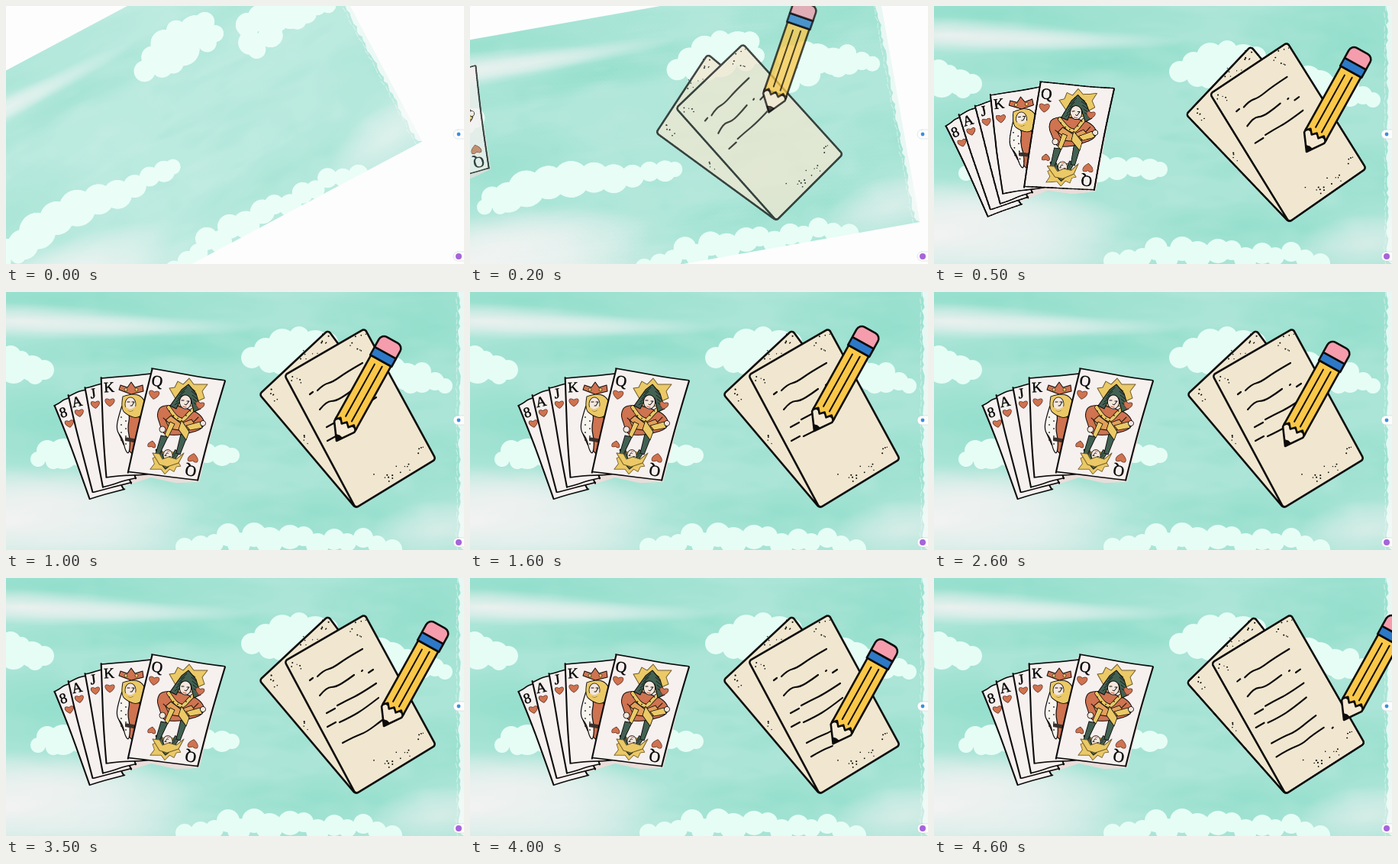
An HTML page with a canvas that plays this animation: 600x338 px, repeating every 4700 ms.

```html
<!DOCTYPE html>
<html lang="en">
<head>
<meta charset="utf-8">
<title>Cards and notes</title>
<style>
html, body { margin: 0; width: 100%; height: 100%; overflow: hidden; background: #fdfdfd; }
canvas { display: block; width: 100%; height: 100%; }
</style>
</head>
<body>
<canvas id="stage" width="600" height="338"></canvas>
<script>
const W = 600, H = 338, LOOP = 4700, STEP = 100;
const INK = '#0d0c0b', HEART = '#cf7350', GOLD = '#ebc966', GREEN = '#436152', SKIN = '#f4e7de';
const screen = document.getElementById('stage').getContext('2d');
let g = screen;

function seeded(seed) {
  return () => {
    seed = (seed * 16807) % 2147483647;
    return seed / 2147483647;
  };
}

function layer(draw) {
  const c = document.createElement('canvas');
  c.width = W * 2;
  c.height = H * 2;
  g = c.getContext('2d');
  g.scale(2, 2);
  g.lineJoin = g.lineCap = 'round';
  draw();
  g = screen;
  return c;
}

function paint(fill, stroke, width) {
  if (fill) { g.fillStyle = fill; g.fill(); }
  if (stroke) { g.strokeStyle = stroke; g.lineWidth = width; g.stroke(); }
}

function poly(p, fill, stroke, width = 1, open = false) {
  g.beginPath();
  for (let i = 0; i < p.length; i += 2) g.lineTo(p[i], p[i + 1]);
  if (!open) g.closePath();
  paint(fill, stroke, width);
}

// Smooth stroke or closed shape through the midpoints of its points
function curve(p, fill, stroke, width = 1) {
  g.beginPath();
  g.moveTo(p[0], p[1]);
  for (let i = 2; i < p.length - 2; i += 2) {
    const last = i === p.length - 4;
    g.quadraticCurveTo(p[i], p[i + 1],
      last ? p[i + 2] : (p[i] + p[i + 2]) / 2,
      last ? p[i + 3] : (p[i + 1] + p[i + 3]) / 2);
  }
  if (p.length === 4) g.lineTo(p[2], p[3]);
  paint(fill, stroke, width);
}

function disc(x, y, rx, fill, stroke, width = 1, ry = rx) {
  g.beginPath();
  g.ellipse(x, y, rx, ry, 0, 0, Math.PI * 2);
  paint(fill, stroke, width);
}

function placed(x, y, deg, draw) {
  g.save();
  g.translate(x, y);
  g.rotate(deg * Math.PI / 180);
  draw();
  g.restore();
}

function haze(x, y, rx, ry, rgb, alpha, tilt = 0) {
  placed(x, y, tilt, () => {
    g.scale(rx, ry);
    const grad = g.createRadialGradient(0, 0, 0, 0, 0, 1);
    grad.addColorStop(0, `rgba(${rgb},${alpha})`);
    grad.addColorStop(0.5, `rgba(${rgb},${alpha * 0.6})`);
    grad.addColorStop(1, `rgba(${rgb},0)`);
    disc(0, 0, 1, grad);
  });
}

function cloud(list) {
  g.beginPath();
  for (const [x, y, r] of list) {
    g.moveTo(x + r, y);
    g.arc(x, y, r, 0, Math.PI * 2);
  }
  paint('#e6fdf5');
}

const sky = layer(() => {
  const rnd = seeded(71);
  g.beginPath();
  g.rect(0, 0, W, H);
  g.clip();
  paint('#aae5d7');
  const teal = '125,216,194', white = '244,243,243';
  haze(70, 10, 260, 40, teal, 0.5, 2);
  haze(250, 72, 300, 26, teal, 0.5, -2);
  haze(60, 170, 150, 60, teal, 0.45);
  haze(540, 40, 150, 90, teal, 0.45);
  haze(410, 290, 150, 45, teal, 0.4);
  haze(590, 220, 90, 50, teal, 0.35);
  for (let i = 0; i < 260; i++) {
    haze(rnd() * W, rnd() * H, 12 + rnd() * 40, 5 + rnd() * 14, i % 2 ? teal : '205,238,230', 0.11, rnd() * 20 - 10);
  }
  haze(20, 38, 210, 24, white, 0.85, 2);
  haze(150, 44, 180, 14, white, 0.55, 1);
  haze(0, 300, 250, 75, white, 1, -3);
  haze(60, 275, 210, 45, white, 0.7, 3);
  haze(130, 325, 160, 40, white, 0.6);
  haze(570, 310, 100, 40, white, 0.6, -8);
  cloud([[6, 84, 14], [20, 88, 11], [10, 102, 18], [34, 100, 17], [50, 102, 13], [38, 110, 11]]);
  cloud([[322, 86, 14], [340, 75, 15], [345, 92, 14], [362, 66, 18], [384, 58, 13], [380, 84, 22],
    [405, 72, 22], [422, 66, 13], [412, 92, 12], [427, 86, 11], [360, 94, 14]]);
  cloud([[470, 96, 16], [490, 96, 18], [462, 118, 16], [465, 130, 12], [505, 104, 20], [525, 111, 18],
    [545, 104, 12], [545, 119, 13], [562, 117, 12], [575, 123, 10], [490, 122, 16], [530, 121, 12]]);
  cloud([[42, 219, 10], [54, 208, 14], [75, 212, 20], [100, 205, 24], [130, 202, 22], [160, 203, 24],
    [190, 206, 20], [215, 212, 19], [240, 213, 15], [263, 211, 13], [283, 214, 14], [296, 214, 10], [62, 222, 10]]);
  cloud([[234, 334, 12], [255, 332, 13], [273, 329, 12], [291, 318, 15], [305, 330, 15], [325, 318, 16],
    [345, 326, 18], [372, 321, 16], [390, 320, 13], [408, 331, 15], [430, 324, 14], [447, 328, 12],
    [468, 322, 13], [486, 331, 12], [506, 337, 13]]);
  // rough paper edge
  const edge = [600, 0];
  for (let y = 0; y <= H; y += 5) edge.push(596 - rnd() * 4, y);
  edge.push(600, H);
  poly(edge, 'rgba(250,253,252,.8)');
  for (let y = 0; y < H; y += 9) poly([589 + rnd() * 3, y, 590 + rnd() * 2, y + 6], null, 'rgba(235,250,246,.5)', 1.2, true);
});

function heart(x, y, s, deg = 8) {
  placed(x, y, deg, () => {
    g.scale(s, s);
    g.beginPath();
    g.moveTo(0, 1);
    g.bezierCurveTo(-1.7, -0.1, -1, -1.2, 0, -0.45);
    g.bezierCurveTo(1, -1.2, 1.7, -0.1, 0, 1);
    paint(HEART, '#5e3526', 0.7 / s);
  });
}

function letter(ch, x, y, deg, size = 19) {
  placed(x, y, deg, () => {
    g.font = `${size}px "Liberation Serif", serif`;
    g.textAlign = 'center';
    g.textBaseline = 'middle';
    g.fillStyle = g.strokeStyle = INK;
    g.lineWidth = 0.5;
    g.fillText(ch, 0, 1);
    g.strokeText(ch, 0, 1);
  });
}

const wobble = seeded(19);
function card(p) {
  poly(p, '#f6f0ef');
  for (let i = 0; i < p.length; i += 2) {
    const j = (i + 2) % p.length, w = () => wobble() * 2 - 1;
    const [x, y, X, Y] = [p[i], p[i + 1], p[j], p[j + 1]];
    curve([x + w(), y + w(), x * 0.65 + X * 0.35 + w(), y * 0.65 + Y * 0.35 + w(),
      x * 0.3 + X * 0.7 + w(), y * 0.3 + Y * 0.7 + w(), X + w(), Y + w()], null, INK, i % 4 ? 2.1 : 1.6);
  }
}

function king() {
  poly([147, 184, 156, 162, 172, 160, 182, 176, 182, 216, 166, 213, 154, 200], HEART, INK, 1);
  curve([155, 140, 148, 160, 144, 181, 153, 192, 156, 207, 161, 213, 163, 196, 159, 178, 163, 160, 155, 140], '#f8f4ef', INK, 1.2);
  for (let i = 0; i < 8; i++) disc(151 + (i % 2) * 6, 164 + i * 5, 0.9, INK);
  curve([153, 137, 150, 153, 160, 162, 174, 166, 185, 151, 178, 136, 164, 133, 153, 137], GOLD, INK, 0.9);
  disc(163, 147, 7, SKIN, INK, 0.8, 9);
  poly([159, 144, 162, 144], null, INK, 1, true);
  poly([165, 144, 168, 144, 165, 149, 163, 149], null, INK, 0.9, true);
  curve([157, 152, 163, 158, 170, 151], null, GOLD, 2.5);
  poly([148, 128, 150, 122, 159, 125, 164, 118, 169, 125, 179, 122, 180, 130, 164, 134], HEART, INK, 1);
  disc(157, 128, 2, GOLD, INK, 0.6);
  disc(171, 128, 2, GOLD, INK, 0.6);
  poly([156, 190, 178, 194, 178, 199, 156, 195], '#39302b');
}

function queenHead() {
  poly([214, 126, 221, 125, 225, 117, 232, 121, 240, 113, 246, 121, 264, 121, 257, 130, 260, 139, 251, 143,
    254, 150, 226, 149, 221, 138], GOLD, '#6f5c2b', 1);
  poly([239, 121, 230, 128, 215, 149, 223, 153, 231, 137, 242, 139, 246, 157, 255, 153, 249, 133], GREEN, INK, 1);
  for (let i = 0; i < 5; i++) {
    poly([237 - i * 3, 125 + i * 5, 229 - i * 2, 132 + i * 4], null, INK, 0.6, true);
    poly([242 + i, 125 + i * 5, 248 + i, 130 + i * 5], null, INK, 0.6, true);
  }
  disc(235, 144, 7.5, SKIN, INK, 0.9, 9);
  poly([230, 142, 233, 142], null, INK, 1, true);
  poly([237, 143, 240, 143, 236, 148, 234, 147], null, INK, 0.9, true);
  poly([232, 150, 236, 151], null, HEART, 1.3, true);
}

function queenBody() {
  curve([223, 149, 204, 147, 197, 160, 202, 174, 205, 186, 222, 188, 240, 185, 256, 180, 261, 171, 254, 160,
    242, 154, 223, 149], HEART, INK, 1);
  poly([209, 168, 216, 162, 229, 172, 243, 167, 250, 177, 233, 182, 214, 179], '#e2a05a', INK, 0.9);
  curve([213, 151, 219, 160, 225, 166, 232, 168, 239, 160, 245, 154], null, INK, 5.5);
  curve([213, 151, 219, 160, 225, 166, 232, 168, 239, 160, 245, 154], null, GOLD, 4);
  poly([208, 187, 215, 170, 221, 173, 212, 191], GOLD, INK, 0.8);
  poly([230, 168, 240, 183, 236, 194, 226, 180], GOLD, INK, 0.8);
  poly([236, 175, 254, 170, 257, 178, 241, 181], GOLD, INK, 0.8);
  disc(205, 180, 4, SKIN, INK, 0.8);
  disc(258, 172, 3.5, SKIN, INK, 0.8);
  for (let i = 0; i < 6; i++) disc(214 + i * 5.5, 156 + Math.sin(i * 0.63) * 10, 0.8, INK);
  poly([214, 172, 206, 165], null, INK, 0.9, true);
  poly([246, 170, 252, 164], null, INK, 0.9, true);
}

const cards = layer(() => {
  poly([160, 241, 187, 104, 286, 118, 253, 249, 222, 250, 190, 243, 112, 268], 'rgba(245,220,218,.85)');
  card([64, 149, 82, 138, 155, 259, 110, 271]);
  letter('8', 75, 158, -18);
  heart(83, 172, 5.5, -10);
  card([81, 136, 106, 127, 165, 250, 114, 263]);
  letter('A', 93, 144, -12);
  heart(96, 158, 5.5, -8);
  card([104, 126, 127, 120, 170, 244, 126, 255]);
  letter('J', 114, 133, -8);
  heart(117, 147, 5.5, -5);
  card([124, 112, 191, 107, 196, 237, 131, 243]);
  king();
  letter('K', 135, 125, -3);
  heart(136, 144, 6, 0);
  card([191, 101, 287, 116, 251, 246, 160, 236]);
  placed(224, 177, 180, () => {
    g.translate(-224, -177);
    g.save();
    g.translate(48, 25);
    g.scale(0.8, 0.8);
    queenHead();
    g.restore();
  });
  // lower plaits and crown
  poly([203, 188, 196, 212, 201, 213, 212, 190], GREEN, INK, 0.9);
  poly([229, 186, 223, 211, 228, 213, 237, 190], GREEN, INK, 0.9);
  poly([192, 211, 201, 212, 205, 219, 213, 216, 223, 219, 233, 211, 226, 224, 211, 229, 201, 226], GOLD, '#6f5c2b', 1);
  queenBody();
  queenHead();
  letter('Q', 198, 117, 9, 20);
  letter('Q', 242, 234, 189, 20);
  heart(194, 134, 6.5);
  heart(254, 148, 5.5, 12);
  heart(191, 200, 5, 190);
  heart(245, 218, 6.5, 190);
});

function sheet(p) {
  g.beginPath();
  const n = p.length;
  g.moveTo((p[0] + p[2]) / 2, (p[1] + p[3]) / 2);
  for (let i = 2; i <= n; i += 2) {
    g.arcTo(p[i % n], p[(i + 1) % n], p[(i + 2) % n], p[(i + 3) % n], 4);
  }
  g.closePath();
  paint('#f1e7d0', INK, 2.6);
}

const paper = layer(() => {
  const rnd = seeded(5);
  const dots = (x, y, sx, sy, n) => {
    for (let i = 0; i < n; i++) disc(x + (rnd() - 0.5) * sx, y + (rnd() - 0.5) * sy, 0.6 + rnd() * 0.5, INK);
  };
  sheet([332, 134, 422, 50, 548, 220, 458, 283]);
  dots(398, 84, 24, 22, 8);
  dots(418, 62, 14, 16, 7);
  dots(350, 134, 18, 20, 8);
  dots(392, 188, 10, 30, 4);
  sheet([365, 109, 470, 48, 563, 219, 458, 283]);
  dots(462, 66, 26, 22, 9);
  dots(382, 115, 18, 14, 5);
  dots(494, 244, 28, 14, 7);
  dots(520, 232, 18, 14, 6);
  dots(541, 212, 12, 18, 4);
});

// Each line: start and end of its writing, then its strokes
const lines = [
  [-2, -1, [[398, 134, 402, 131], [408, 129, 416, 121, 428, 118, 446, 105, 467, 93]]],
  [-1, -0.5, [[411, 154, 420, 143, 432, 143, 448, 133, 456, 127], [466, 122, 467, 121], [475, 124, 481, 120]]],
  [-0.4, 0.25, [[420, 177, 431, 171], [434, 167, 445, 161, 464, 152, 485, 138]]],
  [0.9, 2.2, [[421, 195, 432, 189], [437, 189, 452, 182, 470, 171, 488, 157]]],
  [2.8, 3.5, [[441, 216, 458, 207, 472, 202, 493, 186, 500, 181]]],
  [3.75, 4.3, [[447, 234, 462, 225, 481, 218, 494, 207, 510, 197], [521, 198, 522, 197]]]
];

const tipPath = [[0, 462, 153], [0.25, 485, 139], [0.5, 488, 191], [0.9, 421, 197], [1, 433, 195],
  [1.6, 451, 182], [2.2, 487, 158], [2.6, 460, 202], [2.8, 441, 217], [3.4, 492, 188],
  [3.5, 495, 194], [3.75, 447, 234], [4.3, 510, 197], [4.6, 537, 186]];

const mix = (a, b, k) => a + (b - a) * k;
const clamp = v => Math.min(1, Math.max(0, v));

function tipAt(s) {
  let i = 0;
  while (i < tipPath.length - 2 && s >= tipPath[i + 1][0]) i++;
  const [t0, x0, y0] = tipPath[i], [t1, x1, y1] = tipPath[i + 1];
  const k = clamp((s - t0) / (t1 - t0));
  return [mix(x0, x1, k), mix(y0, y1, k)];
}

function writing(s, tipX) {
  for (const [from, to, strokes] of lines) {
    if (s < from) continue;
    g.save();
    if (s < to) {
      g.beginPath();
      g.rect(0, 0, tipX, H);
      g.clip();
    }
    for (const p of strokes) curve(p, null, INK, 2.2);
    g.restore();
  }
}

function pencil(x, y) {
  placed(x, y, 29, () => {
    poly([0, 0, -15, -21, -15, -27, 15, -27, 15, -21], '#f5e9d3', INK, 2.6);
    poly([0, 0, -5, -7, 0, -8, 5, -7], INK, INK, 1);
    poly([-15, -24, -10, -29, -5, -23, 0, -28, 5, -23, 10, -29, 15, -24, 15, -120, -15, -120], '#fac748', INK, 2.6);
    poly([-5, -34, -5, -112], null, INK, 2, true);
    poly([5, -32, 5, -114], null, INK, 2, true);
    poly([-16, -120, 16, -120, 16, -132, -16, -132], '#2d79c7', INK, 2.6);
    g.beginPath();
    g.roundRect(-16, -151, 32, 19, [8, 8, 1, 1]);
    paint('#f59dac', INK, 2.6);
  });
}

const put = img => g.drawImage(img, 0, 0, W, H);

function moved(cx, cy, dx, deg, alpha, draw) {
  placed(cx + dx, cy, deg, () => {
    g.globalAlpha = alpha;
    g.translate(-cx, -cy);
    draw();
  });
}

function badge(y, color, r) {
  g.beginPath();
  g.roundRect(586, y - 6, 20, 12, 6);
  paint('#fdfdfe', 'rgba(170,190,190,.45)', 0.8);
  disc(593, y, r, color);
}

function render(ms) {
  const s = ms / 1000;
  g.fillStyle = '#fdfdfd';
  g.fillRect(0, 0, W, H);
  g.lineJoin = g.lineCap = 'round';

  const skyLeft = (1 - clamp(s / 0.5)) ** 2;
  moved(300, 169, -99 * skyLeft, -28 * skyLeft, 1 - 0.2 * skyLeft, () => put(sky));

  const cardLeft = (1 - clamp((s - 0.15) / 0.75)) ** 3;
  moved(175, 186, -300 * cardLeft, -28 * cardLeft, clamp((s - 0.05) / 0.2), () => put(cards));

  const noteLeft = (1 - clamp((s - 0.1) / 0.4)) ** 3;
  const sway = -3.5 * (1 - clamp((s - 0.5) / 0.4)) ** 2 - 1.3 * clamp((s - 4.3) / 0.3);
  const [x, y] = tipAt(s);
  const shown = clamp((s - 0.05) / 0.2);
  moved(464, 166, -200 * noteLeft, -24 * noteLeft, shown, () => {
    moved(464, 166, 0, sway, shown, () => {
      put(paper);
      writing(s, x);
    });
    pencil(x, y);
  });

  badge(168, '#3b8fe0', 2.4);
  badge(328, '#a565d8', 4);
}

const start = performance.now();
function tick() {
  const ms = (performance.now() - start) % LOOP;
  render(Math.floor(ms / STEP) * STEP);
  requestAnimationFrame(tick);
}
tick();
</script>
</body>
</html>
```
